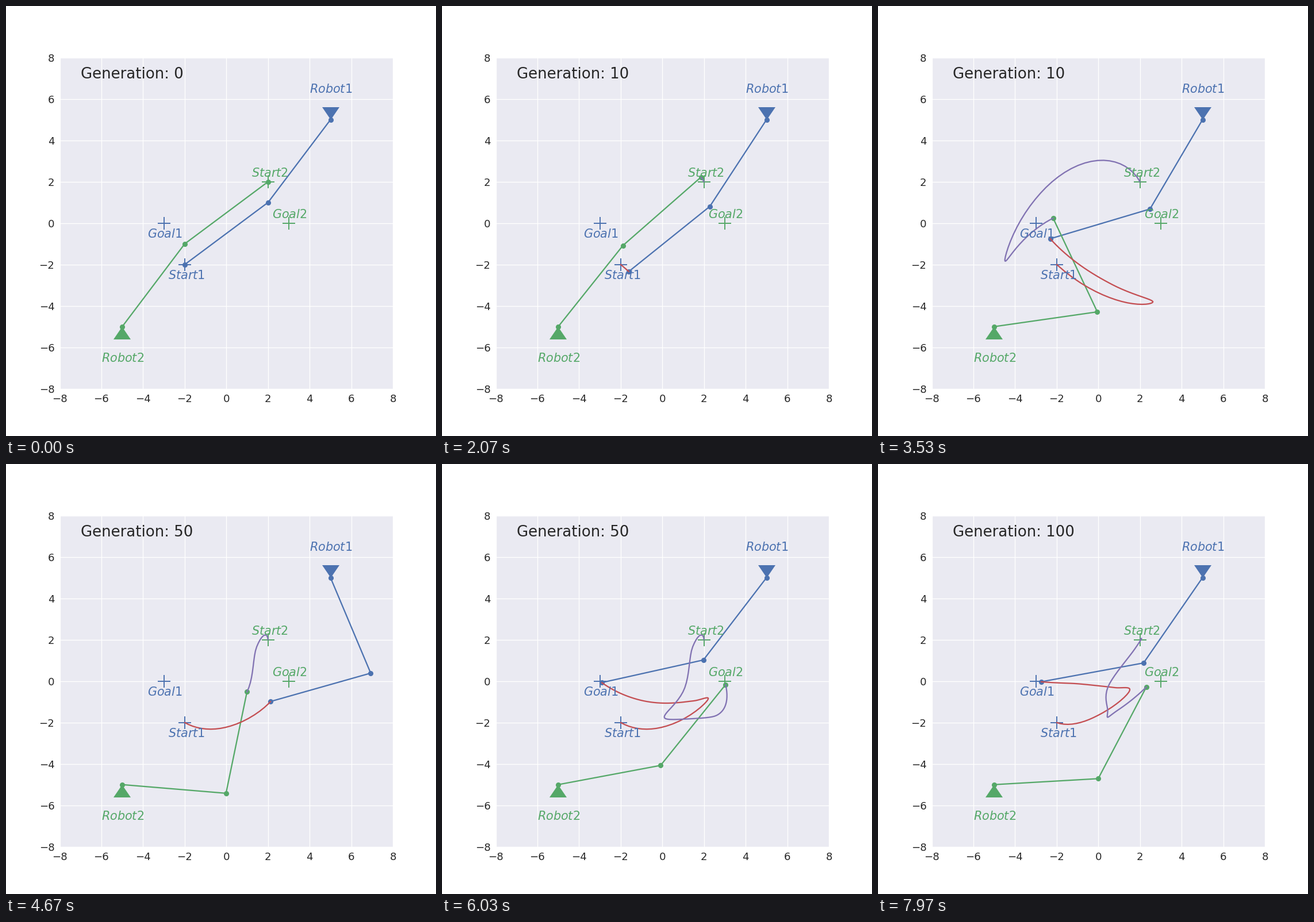
Recreate the animation shown at these times as a matplotlib script. Size 748 by 748 pixels, loop 8000 ms.

```python
import numpy as np
import matplotlib.pyplot as plt
from matplotlib.animation import FuncAnimation

BLUE, GREEN, RED, PURPLE = "#4C72B0", "#55A868", "#C44E52", "#8172B2"
INK = "#262626"
LINK = 5.0
STEPS = 61                  # arm poses per generation
STEP_RATE = 0.03            # poses per millisecond
INTERVAL, LOOP = 25, 8000
GENERATIONS = [0, 10, 50, 100]
BASES = np.array([(5.0, 5.0), (-5.0, -5.0)])
HOME = np.array([(233.13, 216.87), (53.13, 36.87)])   # link angles in degrees
STEP = np.arange(STEPS)
KEY_STEPS = np.array([0, 9, 18, 28, 45, 60])


def spin(robot, *rates):
    """Constant link speeds that die out after step 25."""
    turn = np.where(STEP < 25, STEP, 25 + 6 * np.tanh((STEP - 25) / 6))
    return HOME[robot] + turn[:, None] * rates


def glide(robot, *keys):
    """Smooth link angles from home through the key poses."""
    a = np.array([HOME[robot], *keys])
    t = KEY_STEPS
    slope = np.gradient(a, t, axis=0, edge_order=2)
    i = np.clip(np.searchsorted(t, STEP, side="right") - 1, 0, len(t) - 2)
    h = (t[i + 1] - t[i])[:, None]
    u = (STEP - t[i])[:, None] / h
    ease = u * u * (3 - 2 * u)
    return (a[i] + (a[i + 1] - a[i]) * ease
            + h * u * (1 - u) * ((1 - u) * slope[i] - u * slope[i + 1]))


def poses(robot, angles):
    """Base, elbow and tip position for every step: shape (steps, 3, 2)."""
    rad = np.radians(angles)
    links = LINK * np.stack([np.cos(rad), np.sin(rad)], axis=-1)
    base = np.broadcast_to(BASES[robot], (STEPS, 1, 2))
    return np.cumsum(np.concatenate([base, links], axis=1), axis=1)


# One (blue, green) pair of motions per generation
MOTIONS = [
    (spin(0, -1.64, 2.62),
     spin(1, 5.62, 4.62)),
    (glide(0, (262.4, 230), (279.2, 230.5), (266.5, 216.7), (239.7, 196.7), (226, 187)),
     glide(1, (39, 77.5), (24, 118), (11, 151), (8.2, 115.1), (12, 90))),
    (glide(0, (263.2, 207), (292.7, 195.9), (285.7, 193.2), (256.5, 192.2), (231, 192.7)),
     glide(1, (24, 67.8), (-4.8, 78.4), (-20, 85.5), (-10, 57.5), (12.6, 51.5))),
    (glide(0, (263.5, 201), (286.3, 188.5), (279, 184.3), (254.5, 183.3), (228, 194.6)),
     glide(1, (24.8, 63.6), (-1, 83.8), (-16.5, 82.5), (-14.5, 77), (13, 55))),
]
RUNS = [[poses(robot, angles) for robot, angles in enumerate(pair)]
        for pair in MOTIONS]

plt.rcParams["font.family"] = "DejaVu Sans"
plt.rcParams["mathtext.fontset"] = "dejavusans"

fig = plt.figure(figsize=(8, 8), dpi=93.5, facecolor="white")
ax = fig.add_axes([0.125, 0.11, 0.775, 0.77], facecolor="#EAEAF2")
ax.set(xlim=(-8, 8), ylim=(-8, 8))
ax.set_xticks(range(-8, 9, 2))
ax.set_yticks(range(-8, 9, 2))
ax.tick_params(length=0, pad=7, labelsize=14, labelcolor=INK)
ax.set_axisbelow(True)
ax.grid(color="white", linewidth=1)
ax.spines[:].set_visible(False)


def label(x, y, text, color):
    ax.text(x, y, f"${text}$", color=color, fontsize=16)


for x, y, color in [(-2, -2, BLUE), (-3, 0, BLUE), (2, 2, GREEN), (3, 0, GREEN)]:
    ax.plot(x, y, "+", color=color, ms=17, mew=1.5)
for (x, y), caret, color in zip(BASES, (7, 6), (BLUE, GREEN)):
    ax.plot(x, y, marker=caret, color=color, ms=23, mew=0)

label(4, 6.3, "Robot1", BLUE)
label(-2.8, -2.7, "Start1", BLUE)
label(-3.8, -0.7, "Goal1", BLUE)
label(-6, -6.7, "Robot2", GREEN)
label(1.2, 2.25, "Start2", GREEN)
label(2.2, 0.25, "Goal2", GREEN)
title = ax.text(-7, 7, "", color=INK, fontsize=20)

arms = [ax.plot([], [], "o-", color=c, lw=1.75, ms=7, mew=0)[0]
        for c in (BLUE, GREEN)]
trails = [ax.plot([], [], color=c, lw=1.75, solid_capstyle="round")[0]
          for c in (RED, PURPLE)]


def draw(n):
    # Aim a little past mid-frame so each pose change falls on the nearest tick
    pose = int((n * INTERVAL + 20) * STEP_RATE)
    gen, step = divmod(pose, STEPS)
    title.set_text(f"Generation: {GENERATIONS[gen]}")
    for arm, trail, path in zip(arms, trails, RUNS[gen]):
        arm.set_data(*path[step].T)
        trail.set_data(*path[:step + 1, 2].T if step else ([], []))
    return [title, *arms, *trails]


anim = FuncAnimation(fig, draw, frames=LOOP // INTERVAL, init_func=lambda: draw(0),
                     interval=INTERVAL, repeat=True, repeat_delay=0)
plt.show()
```
